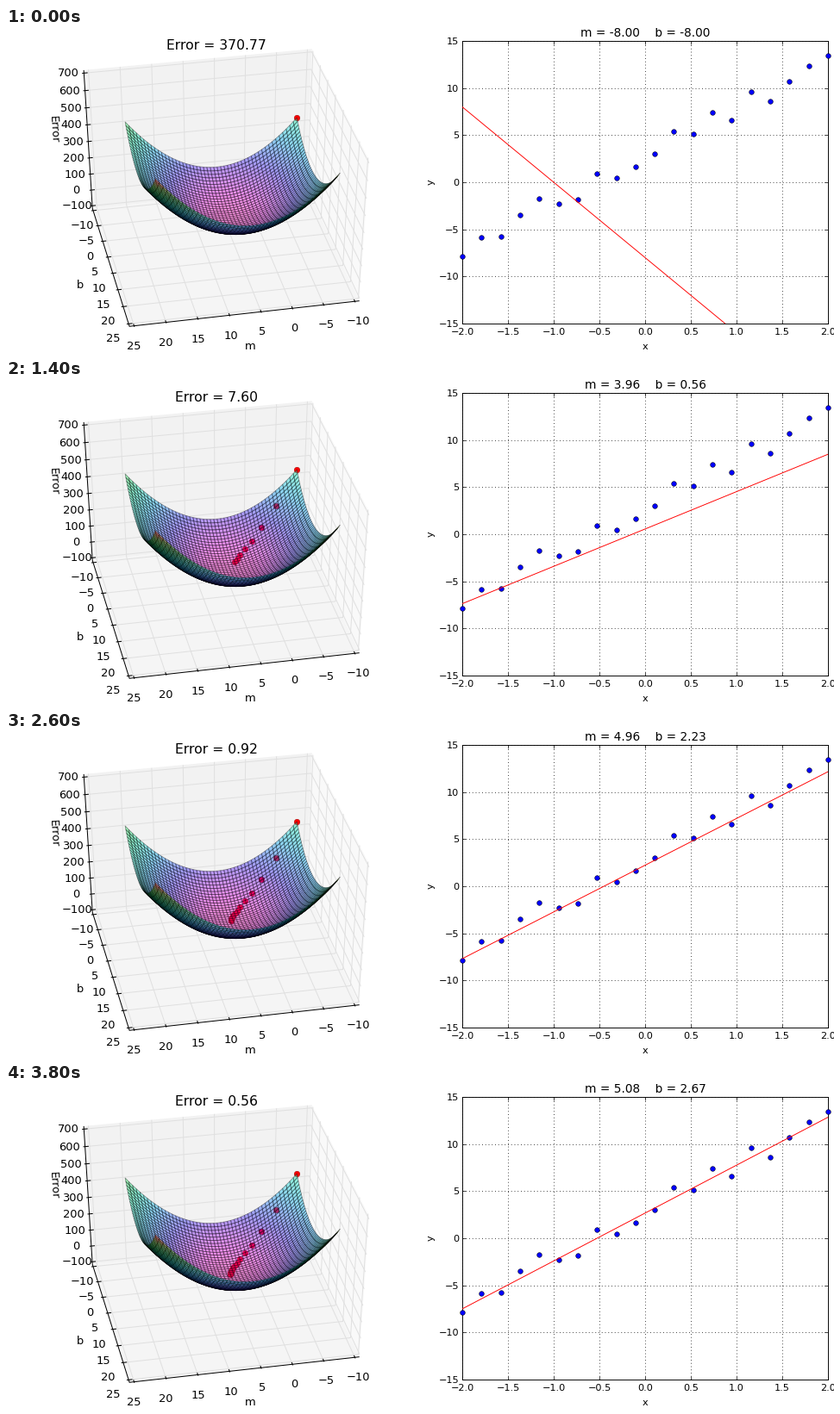
Recreate the animation shown at these times as a matplotlib script. Size 960 by 376 pixels, loop 4000 ms.

```python
import numpy as np
import matplotlib.pyplot as plt
from matplotlib.animation import FuncAnimation
from matplotlib.collections import LineCollection, PolyCollection
from matplotlib.colors import LinearSegmentedColormap
from matplotlib.ticker import MultipleLocator

W, H, DPI = 960, 376, 100
PT = 72 / DPI  # points per pixel
FRAMES, INTERVAL = 20, 200

plt.rcParams["font.family"] = "DejaVu Sans"

# Data, least-squares optimum and the error around it
xs = np.linspace(-2, 2, 20)
ys = [-7.87, -5.85, -5.72, -3.52, -1.78, -2.29, -1.83, 0.91, 0.50, 1.65,
      3.02, 5.40, 5.08, 7.45, 6.63, 9.56, 8.64, 10.66, 12.39, 13.49]
M_BEST, B_BEST, FLOOR = 5.1013, 2.8298, 0.533
XX = np.mean(xs ** 2)
RATE = 0.1


def error(m, b):
    return FLOOR + XX * (m - M_BEST) ** 2 + (b - B_BEST) ** 2


# Gradient descent from (-8, -8)
steps = np.arange(FRAMES)
path_m = M_BEST - (M_BEST + 8) * (1 - 2 * RATE * XX) ** steps
path_b = B_BEST - (B_BEST + 8) * (1 - 2 * RATE) ** steps
path_e = error(path_m, path_b)

# Perspective camera
AZ, EL, DIST = np.radians(78.5), np.radians(40), 10
SA, CA, SE, CE = np.sin(AZ), np.cos(AZ), np.sin(EL), np.cos(EL)


def project(m, b, z):
    """Return pixel x, pixel y and distance from the eye."""
    u, v, w = (m - 7.5) / 35, (b - 7.5) / 35, (z - 300) / 800
    d = DIST - (CA * CE * u + SA * CE * v + SE * w)
    x = (-SA * u + CA * v) / d
    y = (-CA * SE * u - SA * SE * v + CE * w) / d
    return 250.3 + 2601.6 * x, 183.1 - 2027.5 * y, d


def flat(*points):
    return [project(*p)[:2] for p in points]


fig = plt.figure(figsize=(W / DPI, H / DPI), dpi=DPI, facecolor="white")
stage = fig.add_axes([0, 0, 1, 1])
stage.set_xlim(0, W)
stage.set_ylim(H, 0)
stage.axis("off")


def label(x, y, text, size):
    """Text whose digits are centred on (x, y)."""
    return stage.text(x, y + 0.365 * size, text, size=size * PT,
                      ha="center", va="baseline", zorder=5)


def lines(segments, color, zorder):
    stage.add_collection(LineCollection(segments, colors=color,
                                        linewidths=PT, zorder=zorder))


# Box: floor, back wall and right wall
LO, HI = -10 - 35 / 48, 25 + 35 / 48
ZLO, ZHI = -100 - 800 / 48, 700 + 800 / 48
panes = [
    flat((LO, LO, ZLO), (LO, HI, ZLO), (LO, HI, ZHI), (LO, LO, ZHI)),
    flat((LO, LO, ZLO), (HI, LO, ZLO), (HI, LO, ZHI), (LO, LO, ZHI)),
    flat((LO, LO, ZLO), (HI, LO, ZLO), (HI, HI, ZLO), (LO, HI, ZLO)),
]
stage.add_collection(PolyCollection(
    panes, facecolors=["0.975", "0.95", "0.9625"], edgecolors="none", zorder=0))

ticks, zticks = range(-10, 26, 5), range(-100, 701, 100)
grid = [flat((t, HI, ZLO), (t, LO, ZLO), (t, LO, ZHI)) for t in ticks]
grid += [flat((HI, t, ZLO), (LO, t, ZLO), (LO, t, ZHI)) for t in ticks]
grid += [flat((HI, LO, t), (LO, LO, t), (LO, HI, t)) for t in zticks]
lines(grid, "0.88", 1)

OUT, IN = 35 / 120, 35 / 60
marks = [flat((HI, LO, ZHI), (HI, LO, ZLO), (HI, HI, ZLO), (LO, HI, ZLO))]
marks += [flat((t, HI + OUT, ZLO), (t, HI - IN, ZLO)) for t in ticks]
marks += [flat((HI + OUT, t, ZLO), (HI - IN, t, ZLO)) for t in ticks]
marks += [flat((HI + OUT, LO, t), (HI - IN, LO, t)) for t in zticks]
lines(marks, "black", 2)


def minus(n):
    return str(n).replace("-", "\u2212")


for t in ticks:
    k = (t - 7.5) / 17.5
    x, y, _ = project(t, HI, ZLO)
    label(x + 1.5 - 2 * k, y + 22.4, minus(t), 13)
    x, y, _ = project(HI, t, ZLO)
    label(x - 15.5 - 2.5 * k, y + 16.3, minus(t), 13)
for t in zticks:
    x, y, _ = project(HI, LO, t)
    label(x - 18, y - 0.8, minus(t), 13)
label(283, 368, "m", 13)
label(86, 297, "b", 13)
stage.text(55, 118, "Error", size=13 * PT, rotation=-86.4,
           ha="center", va="center", zorder=5)

# Translucent error surface, painted far to near
rainbow = LinearSegmentedColormap.from_list("rainbow", [
    (0.00, (1, 0, 0.75)), (0.06, (0.9, 0, 0.9)), (0.23, (0.2, 0.1, 1)),
    (0.42, (0, 0.7, 1)), (0.58, (0, 0.95, 0.7)), (0.72, (0.1, 0.85, 0.2)),
    (0.86, (0.5, 0.8, 0)), (0.94, (1, 0.4, 0)), (1.00, (1, 0, 0))])
side = np.linspace(-8, 20, 50)
gm, gb = np.meshgrid(side, side)
ge = error(gm, gb)
gx, gy, gd = project(gm, gb, ge)


def corners(a):
    return np.stack([a[:-1, :-1], a[:-1, 1:], a[1:, 1:], a[1:, :-1]],
                    axis=-1).reshape(-1, 4)


order = np.argsort(-corners(gd).mean(axis=1))
quads = np.stack([corners(gx), corners(gy)], axis=-1)[order]
level = corners(ge).mean(axis=1)[order] / ge.max()
stage.add_collection(PolyCollection(
    quads, facecolors=rainbow(level, alpha=0.4),
    edgecolors=[(0, 0, 0, 0.42)], linewidths=0.75 * PT, zorder=4))

# Line-fit plot
LEFT, RIGHT, TOP, BOTTOM = 529, 953, 15, 343
plot = fig.add_axes([LEFT / W, 1 - BOTTOM / H,
                     (RIGHT - LEFT) / W, (BOTTOM - TOP) / H])
plot.set_xlim(-2, 2)
plot.set_ylim(-15, 15)
plot.xaxis.set_major_locator(MultipleLocator(0.5))
plot.yaxis.set_major_locator(MultipleLocator(5))
plot.tick_params(direction="in", top=True, right=True, length=3.8 * PT,
                 width=0.5, labelsize=11.3 * PT)
plot.tick_params(axis="x", pad=5.5 * PT)
plot.tick_params(axis="y", pad=4 * PT)
plot.set_axisbelow(True)
plot.grid(color="black", linewidth=0.5, linestyle=(0, (1.4, 4)))
for spine in plot.spines.values():
    spine.set_linewidth(0.94 * PT)
plot.plot(xs, ys, "o", color="blue", markeredgecolor="black",
          markersize=5.65 * PT, markeredgewidth=0.5 * PT, clip_on=False,
          zorder=3)
fit, = plot.plot([], [], color="red", linewidth=0.94 * PT, zorder=4)
label(741, 369, "x", 11.3)
stage.text(493, 179, "y", size=11.3 * PT, rotation=90,
           ha="center", va="center")

# Moving parts
trail, = stage.plot([], [], "o", color="red", markeredgecolor="#a00000",
                    markersize=6.5 * PT, markeredgewidth=0.5 * PT, zorder=3)
err_title = label(244, 19, "", 15.6)
fit_title = label(741, 5.2, "", 13.6)
path_x, path_y, _ = project(path_m, path_b, path_e)
ends = np.array([-2, 2])


def update(i):
    m, b = path_m[i], path_b[i]
    trail.set_data(path_x[:i + 1], path_y[:i + 1])
    fit.set_data(ends, m * ends + b)
    err_title.set_text(f"Error = {path_e[i]:.2f}")
    fit_title.set_text(f"m = {m:.2f}    b = {b:.2f}")
    return trail, fit, err_title, fit_title


anim = FuncAnimation(fig, update, frames=FRAMES, interval=INTERVAL,
                     repeat=True, blit=False)
plt.show()
```
